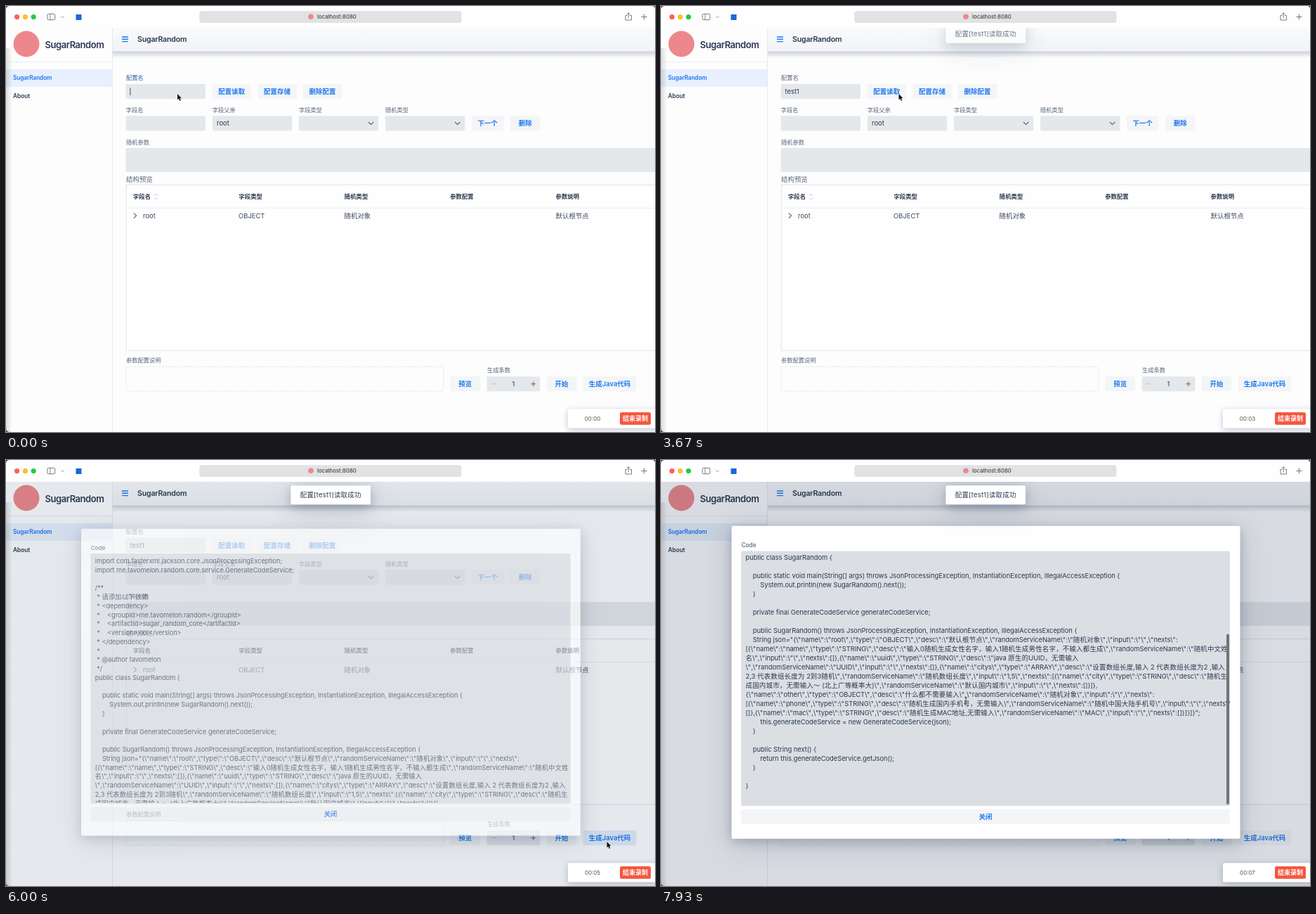
An HTML page that plays this animation: 924 by 606 pixels, repeating every 8000 ms.

```html
<!DOCTYPE html>
<html lang="zh">
<head>
<meta charset="utf-8">
<title>SugarRandom</title>
<style>
html, body { margin: 0; width: 100%; height: 100%; overflow: hidden; background: #5d4a50; }
svg { display: block; width: 100%; height: 100%; }
text {
  font-family: Inter, "Noto Sans CJK SC", "Noto Sans CJK JP", "Noto Sans CJK", sans-serif;
  white-space: pre;
}
.code { letter-spacing: -0.07px; }
.quote { letter-spacing: 0.31px; }
.han { letter-spacing: 0.22px; }
.soft { filter: drop-shadow(0 2px 4px rgba(26, 45, 80, .28)); }
.deep { filter: drop-shadow(0 4px 8px rgba(26, 45, 80, .26)) drop-shadow(0 8px 20px rgba(26, 45, 80, .16)); }
</style>
</head>
<body>
<svg id="stage" viewBox="0 0 924 606" preserveAspectRatio="none">
  <defs>
    <linearGradient id="edge"><stop offset="0" stop-opacity=".13"/><stop offset="1" stop-opacity="0"/></linearGradient>
    <linearGradient id="under" x2="0" y2="1"><stop offset="0" stop-color="#1a2d50" stop-opacity=".2"/><stop offset="1" stop-color="#1a2d50" stop-opacity="0"/></linearGradient>
    <linearGradient id="bar" x2="0" y2="1"><stop offset="0" stop-color="#f9fafb"/><stop offset="1" stop-color="#f1f3f6"/></linearGradient>
    <clipPath id="window"><path d="M6 0H919Q924 0 924 5V606H6Q0 606 0 600V6Q0 0 6 0"/></clipPath>
    <clipPath id="codeBox"><rect x="114" y="129.5" width="696" height="361.5"/></clipPath>
  </defs>
  <g clip-path="url(#window)">
    <rect width="924" height="606" fill="#fdfdfe"/>
    <g id="page"></g>
    <rect id="backdrop" y="31" width="924" height="575" fill="#1a304f"/>
    <g id="dialog"></g>
    <g id="toast"></g>
    <rect y="60" width="9" height="546" fill="url(#edge)"/>
    <g id="chrome"></g>
    <g id="recorder"></g>
    <g id="pointer"></g>
  </g>
</svg>
<script>
const LOOP = 8000;
const BLUE = '#1f78f0', INK = '#2b3950', MUTED = '#596577', FIELD = '#e5e8eb', SOFT = '#f3f5f7', PINK = '#ee878b';
const M = 9.45, S = 8.27;
const $ = id => document.getElementById(id);

function add(parent, tag, attrs = {}) {
  const el = document.createElementNS('http://www.w3.org/2000/svg', tag);
  for (const k in attrs) el.setAttribute(k, attrs[k]);
  parent.appendChild(el);
  return el;
}
const rect = (g, x, y, w, h, fill, more) => add(g, 'rect', { x, y, width: w, height: h, fill, ...more });
const dot = (g, cx, cy, r, fill) => add(g, 'circle', { cx, cy, r, fill });
const line = (g, d, stroke, width = 1, more) => add(g, 'path', {
  d, stroke, fill: 'none', 'stroke-width': width, 'stroke-linecap': 'round', 'stroke-linejoin': 'round', ...more
});
// cy is the middle of the text line
function text(g, x, cy, str, size = M, fill = INK, more = {}) {
  const el = add(g, 'text', { x, y: cy + size * 0.36, 'font-size': size, fill, ...more });
  el.textContent = str;
  return el;
}
const label = (g, x, cy, str) => text(g, x, cy, str, S, MUTED, { 'font-weight': 500 });
function button(g, x, y, w, str) {
  const box = rect(g, x, y, w, 21.3, SOFT, { rx: 2 });
  text(g, x + w / 2, y + 10.6, str, M, BLUE, { 'font-weight': 600, 'text-anchor': 'middle' });
  return box;
}
const field = (g, x, y, w, h = 21.3) => rect(g, x, y, w, h, FIELD, { rx: 2 });

// Escaped quotes and Chinese runs have their own tracking
function codeRow(g, x, cy, row) {
  const el = text(g, x, cy, '', M, INK, { class: 'code' });
  for (const part of row.split(/((?:\\")+|[\u3000-\uffef]+)/)) {
    const kind = part.startsWith('\\"') ? 'quote' : /^[\u3000-\uffef]/.test(part) ? 'han' : 'code';
    add(el, 'tspan', { class: kind }).textContent = part;
  }
}

// Page
const page = $('page');
line(page, 'M151.5 31V606', '#e6e9ee');
line(page, 'M0 79.5H151', '#e9ecf0');
dot(page, 29, 54, 18.5, PINK);
text(page, 55.5, 55.2, 'SugarRandom', 13, INK, { 'font-weight': 600, 'letter-spacing': -0.45 });
rect(page, 0, 90, 151, 25, '#e8f0fd');
text(page, 10, 102.5, 'SugarRandom', S, BLUE, { 'font-weight': 600, 'letter-spacing': -0.1 });
text(page, 10, 128.5, 'About', S, INK, { 'font-weight': 600 });
rect(page, 152, 65, 772, 9, 'url(#under)');
rect(page, 152, 31, 772, 34, 'url(#bar)');
line(page, 'M152 65H924', '#c8ced6', 0.8);
line(page, 'M165.5 44H173.5M165.5 47.3H173.5M165.5 50.6H173.5', BLUE, 1.4);
text(page, 187, 47.6, 'SugarRandom', 10.6, INK, { 'font-weight': 600, 'letter-spacing': -0.2 });

const nameLabel = label(page, 171, 102.5, '配置名');
field(page, 170.5, 111, 113.5);
const nameText = text(page, 176.5, 121.7, '');
const caret = rect(page, 0, 116.3, 0.9, 10.6, INK);
button(page, 293.5, 111, 55.5, '配置读取');
button(page, 358.5, 111, 55, '配置存储');
button(page, 422.7, 111, 55.5, '删除配置');

['字段名', '字段父亲', '字段类型', '随机类型'].forEach((name, i) => {
  const x = 170.7 + i * 123.1;
  label(page, x, 148.2, name);
  field(page, x, 156.3, 113.4);
  if (i > 1) line(page, `M${x + 99.5} 165.5l3.2 3.2 3.2-3.2`, MUTED, 1.2);
});
text(page, 300, 167, 'root');
button(page, 663, 156.3, 45.5, '下一个');
button(page, 718, 156.3, 42.5, '删除');
label(page, 171, 193.7, '随机参数');
field(page, 170.5, 202, 760, 34);
text(page, 171, 246.3, '结构预览', M, MUTED);

rect(page, 171.2, 254.5, 760, 235.5, '#fefefe', { stroke: '#dfe3e8', 'stroke-width': 1 });
line(page, 'M171 287.5H924', '#eceff2');
['字段名', '字段类型', '随机类型', '参数配置', '参数说明'].forEach((name, i) =>
  text(page, 181 + i * 150.4, 271.3, name, 8.4, INK, { 'font-weight': 600 }));
line(page, 'M211.5 269.5l2-2 2 2M211.5 273l2 2 2-2', '#b3bac4', 0.9);
line(page, 'M182.2 294.8l3.4 3.4-3.4 3.4', MUTED, 1.2);
[[195, 'root'], [331, 'OBJECT'], [481.5, '随机对象'], [782.5, '默认根节点']]
  .forEach(([x, str]) => text(page, x, 298.3, str, M, '#3c495e'));

label(page, 171, 504.2, '参数配置说明');
rect(page, 171, 513, 452, 35, 'none', { rx: 2, stroke: '#d3d8de', 'stroke-width': 0.8, 'stroke-dasharray': '1.8 1.4' });
button(page, 632.3, 527, 43, '预览');
label(page, 685, 518.4, '生成条数');
field(page, 684.5, 527, 75.8);
line(page, 'M691.5 537.6H697', '#bcc3cc');
text(page, 722.3, 537.6, '1', M, INK, { 'text-anchor': 'middle' });
line(page, 'M747.8 537.6H753.8M750.8 534.6V540.6', MUTED);
button(page, 769.7, 527, 42.5, '开始');
const javaButton = button(page, 821.7, 527, 75.6, '生成Java代码');

// Dialog
const CODE = String.raw`import com.fasterxml.jackson.core.JsonProcessingException;
import me.tavomelon.random.core.service.GenerateCodeService;

/**
 * 请添加以下依赖
 * <dependency>
 *    <groupId>me.tavomelon.random</groupId>
 *    <artifactId>sugar_random_core</artifactId>
 *    <version>xxx</version>
 * </dependency>
 *
 * @author tavomelon
 */
public class SugarRandom {

    public static void main(String[] args) throws JsonProcessingException, InstantiationException, IllegalAccessException {
        System.out.println(new SugarRandom().next());
    }

    private final GenerateCodeService generateCodeService;

    public SugarRandom() throws JsonProcessingException, InstantiationException, IllegalAccessException {
    String json="{\"name\":\"root\",\"type\":\"OBJECT\",\"desc\":\"默认根节点\",\"randomServiceName\":\"随机对象\",\"input\":\"\",\"nexts\":
[{\"name\":\"name\",\"type\":\"STRING\",\"desc\":\"输入0随机生成女性名字，输入1随机生成男性名字，不输入都生成\",\"randomServiceName\":\"随机中文姓
名\",\"input\":\"\",\"nexts\":[]},{\"name\":\"uuid\",\"type\":\"STRING\",\"desc\":\"java 原生的UUID，无需输入
\",\"randomServiceName\":\"UUID\",\"input\":\"\",\"nexts\":[]},{\"name\":\"citys\",\"type\":\"ARRAY\",\"desc\":\"设置数组长度,输入 2 代表数组长度为2 ,输入
2,3 代表数组长度为 2到3随机\",\"randomServiceName\":\"随机数组长度\",\"input\":\"1,5\",\"nexts\":[{\"name\":\"city\",\"type\":\"STRING\",\"desc\":\"随机生
成国内城市，无需输入～ (北上广等概率大)\",\"randomServiceName\":\"默认国内城市\",\"input\":\"\",\"nexts\":[]}]},
{\"name\":\"other\",\"type\":\"OBJECT\",\"desc\":\"什么都不需要输入\",\"randomServiceName\":\"随机对象\",\"input\":\"\",\"nexts\":
[{\"name\":\"phone\",\"type\":\"STRING\",\"desc\":\"随机生成国内手机号，无需输入\",\"randomServiceName\":\"随机中国大陆手机号\",\"input\":\"\",\"nexts\":
[]},{\"name\":\"mac\",\"type\":\"STRING\",\"desc\":\"随机生成MAC地址,无需输入\",\"randomServiceName\":\"MAC\",\"input\":\"\",\"nexts\":[]}]}]}";
        this.generateCodeService = new GenerateCodeService(json);
    }

    public String next() {
        return this.generateCodeService.getJson();
    }

}`;
const dialog = $('dialog');
rect(dialog, 100.5, 93.7, 724, 445, '#fff', { rx: 2, class: 'deep' });
label(dialog, 114.5, 121.3, 'Code');
const codeField = field(dialog, 114, 129.5, 696, 362.5);
const codeView = add(dialog, 'g', { 'clip-path': 'url(#codeBox)' });
const codeText = add(codeView, 'g');
CODE.split('\n').forEach((row, i) => codeRow(codeText, 120.5, 140.5 + i * 13, row));
const thumb = rect(dialog, 805, 130, 4, 0, '#70757b', { rx: 2 });
button(dialog, 114, 496.7, 696, '关闭');

// Notification
const toast = $('toast');
rect(toast, 405.5, 36.3, 113.5, 27, '#fff', { rx: 2, class: 'deep' });
text(toast, 462.2, 49.8, '配置[test1]读取成功', M, INK, { 'text-anchor': 'middle', class: 'han' });

// Browser bar
const chrome = $('chrome');
rect(chrome, 0, 0, 924, 31, '#fefefe');
['#fe5f57', '#febc2e', '#28c840'].forEach((c, i) => dot(chrome, 15.6 + i * 11.8, 15.6, 3.6, c));
rect(chrome, 59, 11.3, 10.8, 8.4, 'none', { rx: 1.6, stroke: '#6c6c6c', 'stroke-width': 0.9 });
line(chrome, 'M62.8 11.5V19.5', '#6c6c6c', 0.8);
line(chrome, 'M78.5 15l1.8 1.8 1.8-1.8', '#8a8a8a', 0.9);
rect(chrome, 99.5, 12, 8, 8, '#1a68dc');
rect(chrome, 275.3, 7.3, 373.2, 16.8, '#e1e2e3', { rx: 3.5 });
dot(chrome, 434, 15.3, 3.8, PINK);
text(chrome, 443, 15.6, 'localhost:8080', 7.75, '#454545', { 'font-weight': 500 });
line(chrome, 'M884 13.5H882V20H890.5V13.5H888.5M886.2 17V10M884.2 11.8l2-2 2 2', '#6c6c6c', 0.9);
line(chrome, 'M904.8 15.5H912.2M908.5 11.8V19.2', '#6c6c6c', 0.9);

// Recorder
const recorder = $('recorder');
rect(recorder, 800, 573.3, 130, 27.2, '#fff', { rx: 2, class: 'soft' });
const clock = text(recorder, 835, 587, '', 8, '#555', { 'text-anchor': 'middle' });
rect(recorder, 874, 578, 44, 17.8, '#f5573f', { rx: 2.5 });
text(recorder, 896, 587, '结束录制', 9, '#fff', { 'font-weight': 600, 'text-anchor': 'middle' });

// Pointer
const arrow = add($('pointer'), 'path', {
  d: 'M0 0V8.6L2 6.8 3.3 9.9 4.8 9.3 3.5 6.3H6Z',
  fill: '#111', stroke: '#fff', 'stroke-width': 0.8, 'paint-order': 'stroke'
});
const beam = line($('pointer'), 'M-1.6-4.2Q0-4.2 0-3Q0-4.2 1.6-4.2M0-3V3.4M-1.6 4.4Q0 4.4 0 3.4Q0 4.4 1.6 4.4', '#444', 0.9);

const clamp = v => Math.max(0, Math.min(1, v));
const ease = v => v * v * (3 - 2 * v);
function track(t, keys, curve = v => v) {
  let prev = keys[0];
  for (const key of keys) {
    if (t < key[0]) {
      const k = curve(clamp((t - prev[0]) / (key[0] - prev[0])));
      return prev.slice(1).map((v, i) => v + (key[i + 1] - v) * k);
    }
    prev = key;
  }
  return prev.slice(1);
}

const STROKES = [1000, 1330, 1400, 1670, 3000];
const BLUR = 3530;
const PATH = [
  [0, 244, 125], [2070, 244, 125], [2730, 270, 122.5], [3130, 270, 122.5], [3470, 338.5, 125],
  [4400, 338.5, 125], [4530, 744, 484.3], [4730, 744, 484.3], [5530, 855.5, 543],
  [6500, 855.5, 543], [7000, 434, 342]
];
const SCROLL = [[7525, 0], [7530, 45], [7600, 130], [7670, 175.5], [7730, 176], [7800, 174], [7930, 171]];
const show = (el, on) => el.setAttribute('display', on ? 'inline' : 'none');
const move = (el, x, y) => el.setAttribute('transform', `translate(${x} ${y})`);

function render(t) {
  const seconds = t < 1330 ? 0 : Math.floor((t - 330) / 1000);
  clock.textContent = '00:0' + seconds;

  const typed = STROKES.filter(k => k <= t);
  nameText.textContent = 'test1'.slice(0, typed.length);
  nameLabel.setAttribute('fill', t < 70 ? '#2d5ea6' : t < BLUR ? BLUE : MUTED);
  const last = typed.length ? typed[typed.length - 1] : -30;
  caret.setAttribute('x', 176.5 + (typed.length ? nameText.getComputedTextLength() : 0));
  show(caret, t < BLUR && (t - last) % 1000 < 500);

  const drop = 1 - (1 - clamp((t - 3590) / 250)) ** 3;
  show(toast, t >= 3590);
  move(toast, 0, -34 * (1 - drop));
  toast.setAttribute('opacity', drop);

  const open = t < 5990 ? 0 : clamp(0.63 + (t - 6000) / 250);
  const scale = 0.95 + 0.05 * open;
  $('backdrop').setAttribute('opacity', 0.16 * open);
  show(dialog, open > 0);
  dialog.setAttribute('opacity', open);
  dialog.setAttribute('transform', `translate(462.3 316) scale(${scale}) translate(-462.3 -316)`);

  const [scroll] = track(t, SCROLL);
  const over = Math.max(0, scroll - 171);
  const top = 130 + Math.min(scroll, 171) / 171 * 117.5 + over * 0.8;
  move(codeText, 0, -scroll);
  show(thumb, scroll > 0);
  thumb.setAttribute('y', top);
  thumb.setAttribute('height', 242.5 - over * 0.8);

  const [x, y] = track(t, PATH, ease);
  const inCode = open > 0 && x < 810 && y < 492;
  const inName = t >= 2070 && x < 284 && y < 132;
  const hidden = t >= 1000 && t < 2070;
  show(arrow, !hidden && !inCode && !inName);
  show(beam, inCode || inName);
  beam.setAttribute('stroke', inName ? '#fbfbfb' : '#444');
  move(arrow, x, y);
  move(beam, x, y);
  codeField.setAttribute('fill', open > 0 ? '#dbdfe4' : FIELD);
  javaButton.setAttribute('fill', t > 5200 && x > 821 && y > 527 ? '#e1ecfc' : SOFT);
}

const start = performance.now();
function tick() {
  render((performance.now() - start) % LOOP);
  requestAnimationFrame(tick);
}
tick();
</script>
</body>
</html>
```
